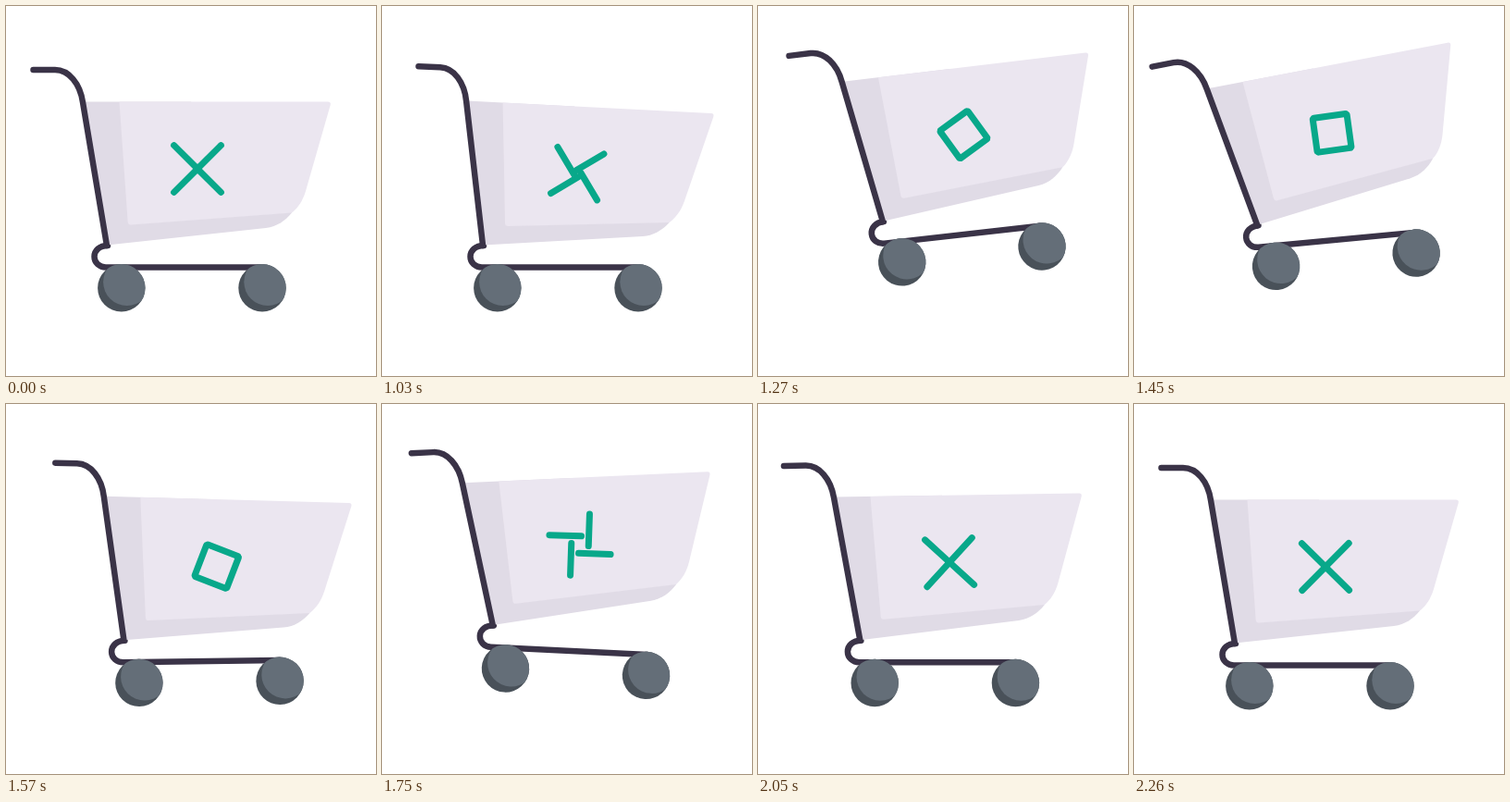
Animation, 400 px wide and 400 px high, one loop 2290 ms. Source, as an HTML page:

```html
<!DOCTYPE html>
<html lang="en">
<head>
<meta charset="utf-8">
<title>Shopping cart</title>
<style>
  html, body { margin: 0; height: 100%; overflow: hidden; background: #fff; }
  svg { display: block; width: 100%; height: 100%; }
  .frame { fill: none; stroke: #3a3347; stroke-width: 6.5; stroke-linecap: round; stroke-linejoin: round; }
  .arm { stroke: #08a88a; stroke-width: 7; stroke-linecap: round; }
</style>
</head>
<body>
<svg viewBox="0 0 400 400">
  <defs>
    <clipPath id="rim"><circle r="25.700"/></clipPath>
    <g id="wheel">
      <circle r="25.700" fill="#495159"/>
      <circle cx="6" cy="-6.500" r="25.700" fill="#646e78" clip-path="url(#rim)"/>
    </g>
    <path id="arm" class="arm" d="M-17.300 0H17.300"/>
  </defs>
  <g id="cart">
    <path class="frame" d="M110 259C101 259 95.500 264.500 95.500 271S101 282.500 108 282.500H277"/>
    <use href="#wheel" x="124.800" y="304.800"/>
    <use href="#wheel" x="277" y="304.800"/>
    <g id="basket">
      <path fill="#e0dbe6" d="M84 103.500H200L309 223.500C302 232 293 238.500 281 240L109 258.500Z"/>
      <path fill="#ebe6f0" d="M122.500 103.500H348Q351.500 103.500 350.700 107L324 200C321 210 316 218 309 223.500L135 236.500Q132 236.700 131.700 233.500Z"/>
      <path class="frame" d="M29.500 69H53C68 69 80 84 83 104L109 259"/>
      <g id="cross"></g>
    </g>
  </g>
</svg>
<script>
  const LOOP = 2290, HOLD = 1000, STEP = 30;

  // Progress, eased progress and a rise-and-fall between two steps
  const span = (s, from, to) => Math.min(1, Math.max(0, (s - from) / (to - from)));
  const ease = (s, from, to) => (1 - Math.cos(Math.PI * span(s, from, to))) / 2;
  const arc = (s, from, to) => Math.sin(Math.PI * span(s, from, to));

  // The cart hops forward, then takes a lower hop back; the basket lags behind
  const shift = s => 17.45 * (ease(s, 2, 9) - ease(s, 19.8, 38.4));
  const hop = s => -39.2 * arc(s, 3, 19.6) - 17.5 * arc(s, 19.6, 36);
  const tilt = s => -7.05 * arc(s, 3, 19.6) + 3.15 * arc(s, 19.6, 35);
  const swing = s => 8.5 * arc(s, 0, 8.8) - 6 * arc(s, 8.8, 18.5)
    + 7 * arc(s, 18.5, 23) - 6.4 * arc(s, 20, 35.7);

  // The cross turns a quarter while each arm flips over through a square
  const turn = s => 90 * (1 - Math.exp(-((Math.max(0, s - 5) / 12) ** 1.5)));
  const flip = s => 90 * (span(s, 0, 8) + span(s, 19, 28));

  const pose = (el, value) => el.setAttribute('transform', value);
  const [cart, basket, cross] = ['cart', 'basket', 'cross'].map(id => document.getElementById(id));

  function draw() {
    const s = Math.max(0, Math.floor((performance.now() % LOOP - HOLD) / STEP));
    pose(cart, `translate(${shift(s)} ${hop(s)}) rotate(${tilt(s)} 200 188)`);
    pose(basket, `rotate(${swing(s)} 109 260)`);
    pose(cross, `translate(207 176) rotate(${turn(s)})`);
    [...cross.children].forEach((arm, i) =>
      pose(arm, `rotate(${45 + 90 * i}) translate(18.6) rotate(${flip(s)})`));
    requestAnimationFrame(draw);
  }

  cross.innerHTML = '<use href="#arm"/>'.repeat(4);
  draw();
</script>
</body>
</html>
```
